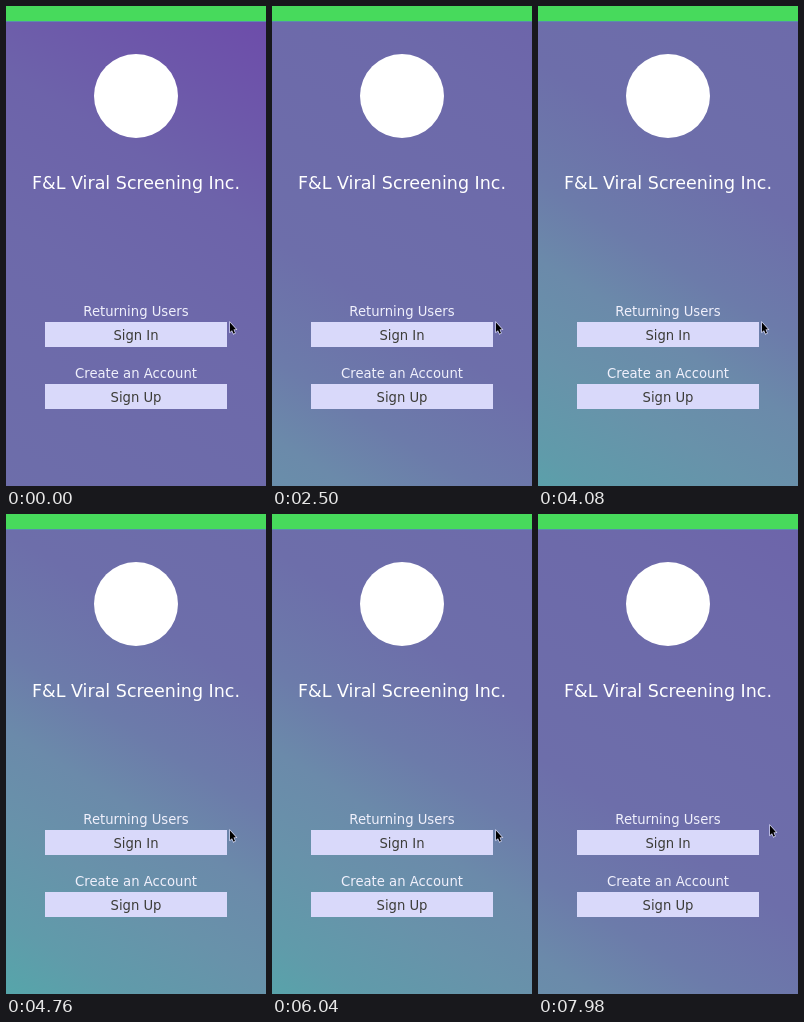
Animation of 260x480 px, one loop 8 s. Source, as an HTML page with a canvas:

```html
<!DOCTYPE html>
<html lang="en">
<head>
<meta charset="utf-8">
<title>Sign in</title>
<style>
  html, body { margin: 0; width: 100%; height: 100%; overflow: hidden; background: #6d6daa; }
  canvas { display: block; width: 260px; height: 480px; }
</style>
</head>
<body>
<canvas id="stage" width="260" height="480"></canvas>
<script>
const W = 260, H = 480, LOOP = 8000;
const ctx = document.getElementById('stage').getContext('2d');
const SLOPE = 0.62;              // tilt of the colour bands
const FROM = -800, TO = 400;     // extent of the colour ramp around its moving centre
const RAMP = [
  [-800, '#6d49aa'], [-650, '#6d58aa'], [-550, '#6d63aa'], [-400, '#6d69aa'],
  [-120, '#6d6eaa'], [0, '#6c7baa'], [80, '#6b8aaa'], [170, '#6892aa'],
  [270, '#609baa'], [400, '#4eaeaa']
];

// The bands drift up and back; the picture rests briefly every 840 ms.
function heldTime(t) {
  const rest = (t - 720) % 840;
  return t >= 1560 && rest < 100 ? t - rest : t;
}

function bandCentre(t) {
  return 130 + 250 * (1 - Math.cos(Math.PI * (t - 5200) / 5800));
}

function background(t) {
  const centre = bandCentre(t);
  const point = u => {
    const k = (centre + u) / (1 + SLOPE * SLOPE);
    return [-SLOPE * k, k];
  };
  const fill = ctx.createLinearGradient(...point(FROM), ...point(TO));
  for (const [u, colour] of RAMP) fill.addColorStop((u - FROM) / (TO - FROM), colour);
  ctx.fillStyle = fill;
  ctx.fillRect(0, 0, W, H);
  ctx.fillStyle = '#47da5c';
  ctx.fillRect(0, 0, W, 15);
  ctx.fillStyle = '#5a8cae';
  ctx.fillRect(0, 15, W, 1);
}

function label(text, y, size, colour) {
  ctx.font = `${size}px "DejaVu Sans", sans-serif`;
  ctx.textAlign = 'center';
  ctx.fillStyle = colour;
  ctx.fillText(text, 130, y);
}

function button(text, y) {
  ctx.fillStyle = '#d9d9fa';
  ctx.fillRect(39, y, 182, 25);
  label(text, y + 18, 13.2, '#3c3c38');
}

function emblem() {
  ctx.fillStyle = '#fff';
  ctx.beginPath();
  ctx.arc(130, 90, 42, 0, 2 * Math.PI);
  ctx.fill();
}

function cursor(t) {
  const p = Math.min(1, Math.max(0, (t - 7700) / 270));
  ctx.save();
  ctx.translate(223.5 + 8 * p, 316 - 5 * p);
  ctx.beginPath();
  for (const [x, y] of [[0.5, 0.5], [0.5, 10], [2.5, 8.2], [4.1, 11.8], [5.5, 11], [4, 7.5], [6.6, 7.3]]) {
    ctx.lineTo(x, y);
  }
  ctx.closePath();
  ctx.strokeStyle = '#e8e8ff';
  ctx.lineWidth = 1.2;
  ctx.stroke();
  ctx.fillStyle = '#000';
  ctx.fill();
  ctx.restore();
}

function draw(now) {
  const t = heldTime(now % LOOP);
  background(t);
  emblem();
  label('F&L Viral Screening Inc.', 183, 17.5, '#fff');
  label('Returning Users', 310, 13.2, '#f0f0fc');
  button('Sign In', 316);
  label('Create an Account', 372, 13.2, '#f0f0fc');
  button('Sign Up', 378);
  cursor(t);
}

const start = performance.now();
function tick() {
  draw(performance.now() - start);
  requestAnimationFrame(tick);
}
tick();
</script>
</body>
</html>
```
